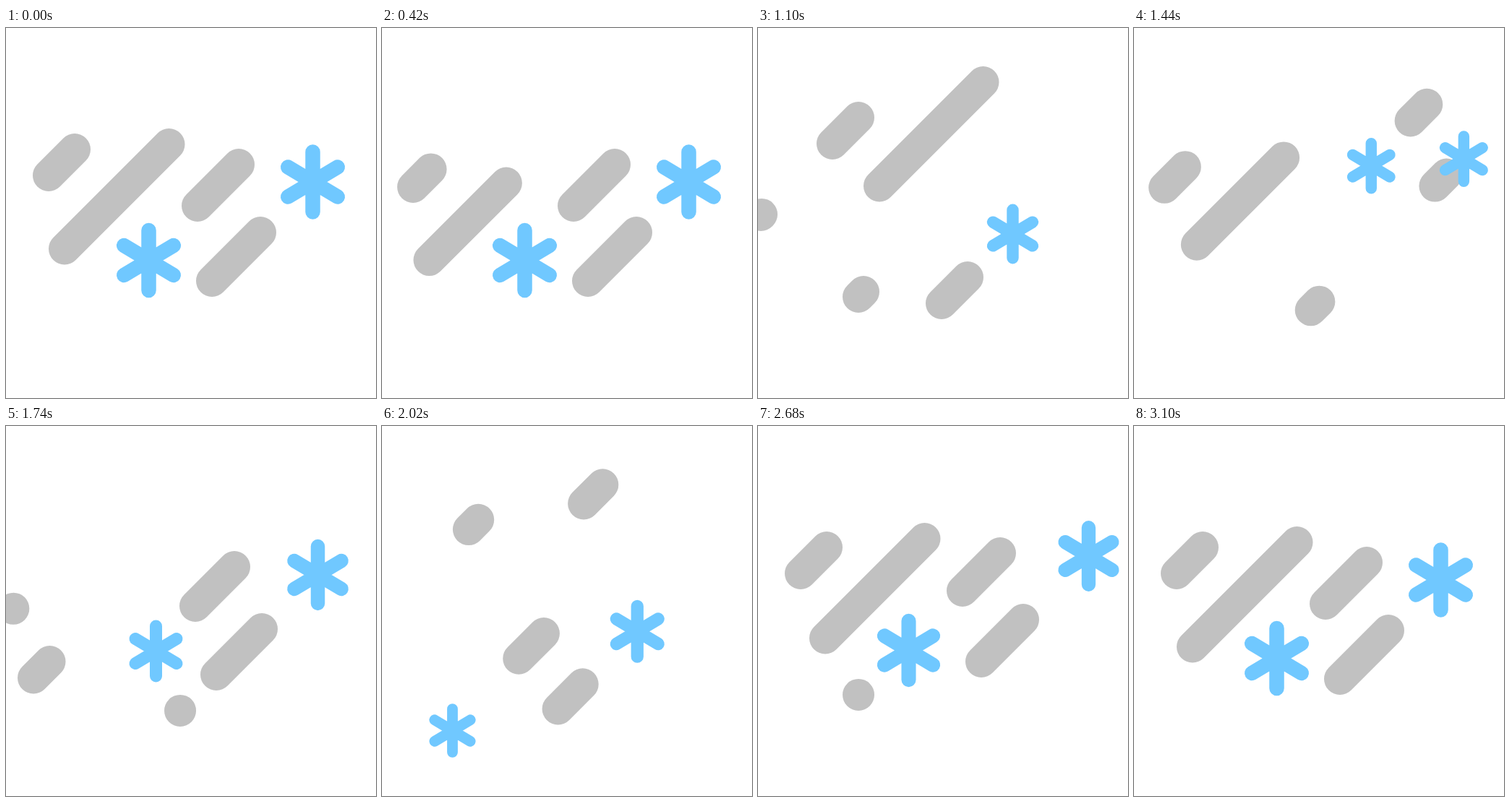
An HTML page with a canvas for the animation above (3600 ms loop, 512 px wide and 512 px high).

```html
<!DOCTYPE html>
<html lang="en">
<head>
<meta charset="utf-8">
<title>Sleet</title>
<style>
  html, body { margin: 0; height: 100%; overflow: hidden; background: #fff; }
  canvas { display: block; width: 100vw; height: 100vh; }
</style>
</head>
<body>
<canvas id="stage" width="512" height="512"></canvas>
<script>
const LOOP = 3600, STEP = 20;
const GRAY = '#c1c1c1', BLUE = '#70c8ff';
const ctx = document.getElementById('stage').getContext('2d');
ctx.lineCap = 'round';

// Streak keys: [time, head shift, tail shift]; flake keys: [time, shift, scale].
// Shifts run down-left from rest. A bare time stands for the spawn pose
// at the start of pass and enter, and for the rest pose elsewhere.
const items = [
  { x: 59, y: 204, len: 36, spawn: [-81, -45],
    exit: [[200], [680, 42, 71], [1120, 55, 90]],
    pass: [[880], [1100, -44, -44], [1760, 49, 85]],
    enter: [[1800], [2300, -21.5, -21.5], [2660]] },
  { x: 81, y: 305.5, len: 144.5, spawn: [-240, -96],
    exit: [[200], [680, 45, 155], [900, 59, 203]],
    pass: [[880, -231, -87], [1100, -87, -86], [1740, 43, 165], [1820, 53, 197]],
    enter: [[1760], [2300, -117, -48], [2680, -12, -5], [3060]] },
  { x: 265, y: 246, len: 57, spawn: [-178, -121],
    exit: [[540], [680, 20.5, 22], [1100, 126, 176], [1180, 127, 184]],
    pass: [[1200], [1740, 3, 6], [2300, 118, 165], [2700, 126, 183]],
    enter: [[2060], [2300, -128, -90], [2680, -18, -13], [3080]] },
  { x: 285, y: 350, len: 67, spawn: [-163, -96],
    exit: [[700], [1100, 31, 62], [1760, 44, 111]],
    pass: [[1300], [1740, -6, -2], [2300, 70, 134], [2400, 74, 141]],
    enter: [[2280], [2680, -24, -15], [3080]] },
  { x: 197.5, y: 321.5, flake: true, spawn: [-160, 0.72],
    exit: [[500], [680, 20.5, 0.97], [1060, 117, 0.72]],
    pass: [[1280], [1740, -10, 0.83], [2040, 101, 0.72]],
    enter: [[2080], [2300, -99, 0.86], [2680, -11, 0.98], [3080]] },
  { x: 424.5, y: 213, flake: true, spawn: [-84, 0.72],
    exit: [[700], [1100, 72, 0.8], [1400, 136, 0.72]],
    pass: [[1420, -32, 0.75], [1740, -7, 0.95], [2310, 136, 0.73]],
    enter: [[2320], [2680, -33, 0.945], [3080]] }
];

for (const item of items) {
  const rest = [0, item.flake ? 1 : 0];
  const fill = (keys, first) => keys.map((key, i) =>
    key.length > 1 ? key : [key[0], ...(i ? rest : first)]);
  item.runs = [fill(item.exit, rest), fill(item.pass, item.spawn), fill(item.enter, item.spawn)];
}

// Slope at a key: zero at the ends, harmonic mean inside, so nothing overshoots.
function slope(keys, i, c) {
  if (i === 0 || i === keys.length - 1) return 0;
  const rate = j => (keys[j + 1][c] - keys[j][c]) / (keys[j + 1][0] - keys[j][0]);
  const a = rate(i - 1), b = rate(i);
  return a * b > 0 ? 2 * a * b / (a + b) : 0;
}

function pose(keys, t, c) {
  const last = keys.length - 1;
  if (t <= keys[0][0]) return keys[0][c];
  if (t >= keys[last][0]) return keys[last][c];
  const i = keys.findIndex(key => key[0] > t) - 1;
  const span = keys[i + 1][0] - keys[i][0];
  const u = (t - keys[i][0]) / span, v = 1 - u;
  return keys[i][c] * v * v * (1 + 2 * u) + keys[i + 1][c] * u * u * (1 + 2 * v)
    + span * u * v * (slope(keys, i, c) * v - slope(keys, i + 1, c) * u);
}

function line(x1, y1, x2, y2) {
  ctx.moveTo(x1, y1);
  ctx.lineTo(x2, y2);
}

function drawStreak({ x, y, len }, head, tail) {
  const reach = Math.max(len - tail, 0.01 - head);
  ctx.strokeStyle = GRAY;
  ctx.lineWidth = 44;
  ctx.beginPath();
  line(x - head, y + head, x + reach, y - reach);
  ctx.stroke();
}

function drawFlake({ x, y }, shift, scale) {
  ctx.save();
  ctx.translate(x - shift, y + shift);
  ctx.scale(scale, scale);
  ctx.strokeStyle = BLUE;
  ctx.lineWidth = 20.5;
  ctx.beginPath();
  line(0, -41.5, 0, 41.5);
  line(-34.3, -20.5, 34.3, 20.5);
  line(-34.3, 20.5, 34.3, -20.5);
  ctx.stroke();
  ctx.restore();
}

function draw(t) {
  ctx.clearRect(0, 0, 512, 512);
  for (const item of items) {
    item.runs.forEach((keys, n) => {
      const born = n === 0 || t >= keys[0][0];
      const gone = n < 2 && t > keys[keys.length - 1][0];
      if (!born || gone) return;
      (item.flake ? drawFlake : drawStreak)(item, pose(keys, t, 1), pose(keys, t, 2));
    });
  }
}

const start = performance.now();
function tick() {
  const t = (performance.now() - start) % LOOP;
  draw(Math.floor(t / STEP) * STEP);
  requestAnimationFrame(tick);
}
tick();
</script>
</body>
</html>
```
